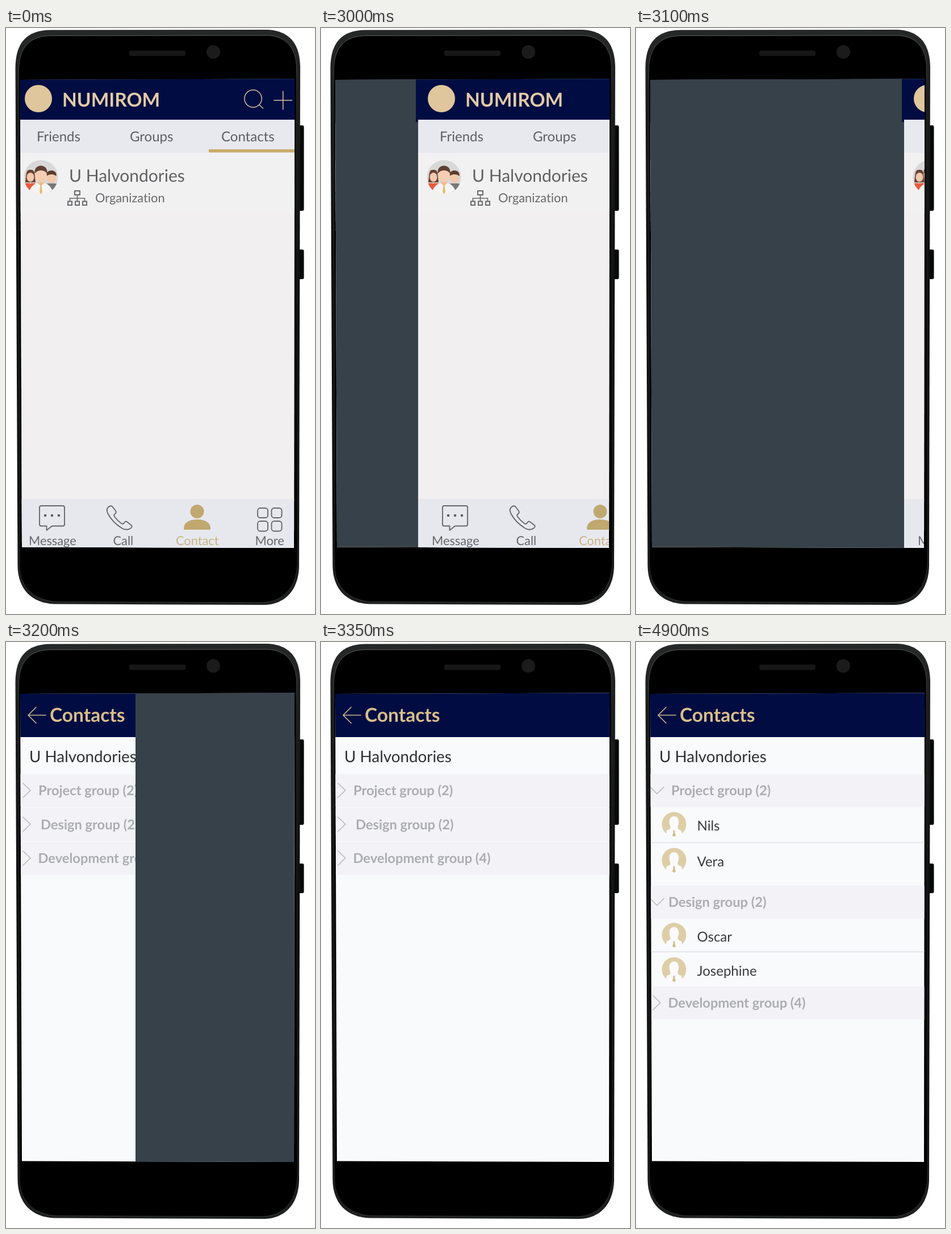
An HTML page for the animation above (5.9 s loop, 544 px wide and 1029 px high).

```html
<!DOCTYPE html>
<html lang="en">
<head>
<meta charset="utf-8">
<title>Contacts</title>
<style>
  html, body { margin: 0; width: 100%; height: 100%; overflow: hidden; background: #fff; }
  svg { display: block; }
  text { font-family: Lato, sans-serif; font-variant-ligatures: none; text-rendering: geometricPrecision; }
  .b { font-weight: 700; }
  .line { fill: none; stroke-linecap: round; stroke-linejoin: round; }
</style>
</head>
<body>
<svg width="544" height="1029" viewBox="0 0 544 1029">
  <defs>
    <linearGradient id="rim" x1="0" y1="0" x2="0" y2="1">
      <stop offset="0" stop-color="#262828"/>
      <stop offset=".12" stop-color="#1c1e1e"/>
      <stop offset=".4" stop-color="#101111"/>
      <stop offset=".85" stop-color="#121313"/>
      <stop offset="1" stop-color="#1f2121"/>
    </linearGradient>
    <linearGradient id="glint" x1="0" y1="0" x2="0" y2="1">
      <stop offset="0" stop-color="#5a5c5c"/>
      <stop offset=".1" stop-color="#2a2c2c"/>
      <stop offset=".9" stop-color="#1c1e1e"/>
      <stop offset="1" stop-color="#333535"/>
    </linearGradient>
    <clipPath id="screen"><path d="M25 91 508 89.5 507 913 28 911.5Z"/></clipPath>
    <clipPath id="disc"><circle cx="61.5" cy="262" r="30"/></clipPath>
    <g id="user">
      <circle r="21.5" fill="#decea6"/>
      <path d="M-6.5 4C-10 -3 -8.500 -14 0 -14S10 -3 6.500 4C6 9 8 9 13 11L15 22H-15L-13 11C-8 9 -6 9 -6.500 4Z" fill="#fafafc"/>
      <path d="M-2 11H2L1.200 14 3 20 0 22 -3 20 -1.200 14Z" fill="#d3bd87"/>
    </g>
  </defs>

  <!-- phone body -->
  <path d="M515 171H522Q524.500 171 524.500 174V318Q524.500 321 522 321H515ZM515 389H522Q524.500 389 524.500 392V438Q524.500 441 522 441H515Z" fill="#060707"/>
  <path d="M16.500 70C17 26 36 4 78 3.500L460 3C500 5 517 28 518 68L516 945C515 988 490 1012 455 1013L85 1011.500C45 1010 21 985 20.500 945Z" fill="url(#rim)"/>
  <path d="M22.500 72C24 33 42 13.500 80 13.500L462 13C494 15 510 35 511.500 68L513 940C511 984 488 1007 452 1009L88 1007.500C50 1005 25 983 24 945Z" fill="#000" stroke="url(#glint)" stroke-width="1"/>
  <rect x="217" y="39.500" width="99" height="9.500" rx="3" fill="#171717"/>
  <circle cx="365" cy="42" r="12" fill="#1b1b1c"/>

  <g clip-path="url(#screen)">
    <!-- organisation tree -->
    <rect x="20" y="85" width="495" height="832" fill="#f9fafc"/>
    <rect x="20" y="85" width="495" height="82" fill="#010d42"/>
    <path class="line" d="M53 114.500 39 128.500 53 142.500M39 128.500H70" stroke="#cdb686" stroke-width="1.700"/>
    <text class="b" x="77" y="140" font-size="33.500" fill="#d9be8b">Contacts</text>
    <text x="41" y="210.500" font-size="27.800" fill="#303032">U Halvondories</text>
    <g id="tree"></g>

    <rect id="cover" y="85" width="520" height="832" fill="#364149"/>

    <!-- home page -->
    <g id="home">
      <rect x="16" y="160" width="500" height="757" fill="#f1eff0"/>
      <rect x="16" y="219" width="500" height="107" fill="#f2f1f2"/>
      <path d="M12 85H516V161H16V165H12Z" fill="#010d42"/>
      <circle cx="57" cy="124" r="24" fill="#e0c69d"/>
      <text class="b" x="99" y="137.500" font-size="33.500" fill="#e4cba6">NUMIROM</text>
      <path class="line" d="M446.500 135.500 452.500 141M472 127H503.500M487.700 111V143" stroke="#d6c1a0" stroke-width="1.500"/>
      <circle cx="435" cy="124" r="15.200" fill="none" stroke="#d6c1a0" stroke-width="1.500"/>

      <rect x="16" y="161" width="500" height="58" fill="#e7e9ef"/>
      <rect x="357" y="213" width="160" height="5.500" fill="#c9ac69"/>
      <g font-size="24" fill="#5e5f62">
        <text x="54" y="199">Friends</text>
        <text x="218" y="199">Groups</text>
        <text x="379" y="199">Contacts</text>
      </g>

      <g clip-path="url(#disc)">
        <rect x="31" y="232" width="61" height="61" fill="#d8d8d8"/>
        <path d="M34 271C36 254 35 249 43 249S50 254 52 271Z" fill="#6b4033"/>
        <ellipse cx="43" cy="262" rx="6.500" ry="8" fill="#f2c9ac"/>
        <path d="M29 275Q36 271 43 273 50 271 56 275L43 284V293H29Z" fill="#e85b3e"/>
        <path d="M66 276Q72 272 80 273 89 272 95 276V293H80Z" fill="#77787a"/>
        <ellipse cx="80" cy="263" rx="8" ry="9.500" fill="#f2c9ac"/>
        <path d="M71.500 260C69 247 91 247 88.500 260Q85 257 80 257T71.500 260Z" fill="#5b3c2f"/>
        <path d="M39 293Q43 275 56 272H67Q80 275 84 293Z" fill="#f6f4f3"/>
        <path d="M56 264H67V273L61.500 277 56 273Z" fill="#eebf9e"/>
        <ellipse cx="61.500" cy="259" rx="10.500" ry="12" fill="#f5cdb0"/>
        <path d="M50.500 256C48 237 75 237 72.500 256Q69 250 61.500 250T50.500 256Z" fill="#5f4031"/>
        <path d="M59.500 273H63.500L62.500 277 64 288 61.500 292 59 288 60.500 277Z" fill="#e8b970"/>
      </g>
      <text x="111" y="270" font-size="30" fill="#5f6062">U Halvondories</text>
      <g fill="none" stroke="#68696b" stroke-width="2">
        <path d="M121 286H130V293H121ZM109 304.500H116V311H109ZM122 304.500H129V311H122ZM135 304.500H142V311H135Z"/>
        <path d="M125.500 293V304.500M112.500 304.500V299H138.500V304.500" stroke-width="1.700"/>
      </g>
      <text x="157" y="306" font-size="21.800" fill="#67686a">Organization</text>

      <rect x="16" y="827" width="500" height="90" fill="#e7e8ee"/>
      <g class="line" stroke="#66676a" stroke-width="1.900">
        <path d="M62 839H100Q103 839 103 842V871.500Q103 874.500 100 874.500H81L71.500 882V874.500H62Q59 874.500 59 871.500V842Q59 839 62 839Z"/>
        <path d="M180 841.500Q184 838 187 840L193 848Q195 851 192 853 189 855 191 858 196 865 203 870 206 872 208 869 210 865.500 213 867L220.500 873Q223 875.500 220 878 214 883 205 879 187 868 179 852 176 845 180 841.500Z"/>
      </g>
      <path d="M67 854h4v4h-4zM79 854h4v4h-4zM91 854h4v4h-4z" fill="#5f6062"/>
      <g fill="#c0a870">
        <circle cx="336.500" cy="849" r="12"/>
        <path d="M313 879C313 868 323 863 336.500 863S360 868 360 879Q360 881 357 881H316Q313 881 313 879Z"/>
      </g>
      <g fill="none" stroke="#66676a" stroke-width="1.900">
        <rect x="443" y="843" width="18" height="17" rx="4.500"/>
        <rect x="467.500" y="843" width="18" height="17" rx="4.500"/>
        <rect x="443" y="866" width="18" height="17.500" rx="4.500"/>
        <rect x="467.500" y="866" width="18" height="17.500" rx="4.500"/>
      </g>
      <g font-size="21.800" fill="#66676a">
        <text x="40" y="908">Message</text>
        <text x="188.500" y="908">Call</text>
        <text x="299" y="908" fill="#c9b485">Contact</text>
        <text x="438.500" y="908">More</text>
      </g>
    </g>
  </g>
</svg>
<script>
const LOOP = 5900, STEP = 50;
const SLIDE_AT = 3000, WIPE_AT = 3150, OPEN_ONE = 3900, OPEN_TWO = 4900;
const $ = id => document.getElementById(id);

const row = (y, label, x, open) => {
  const m = y + 28.5;
  const arrow = open ? `M25 ${m - 6}l12 12 12-12` : `M30 ${m - 12.5}l13 12.500-13 12.500`;
  return `<rect x="20" y="${y}" width="495" height="57.500" fill="#f2f2f7"/>
    <path class="line" d="${arrow}" stroke="#b7b8bb" stroke-width="1.500"/>
    <text class="b" x="${x}" y="${y + 37}" font-size="23.700" fill="#acadb1">${label}</text>`;
};
const member = (y, name) => `<use href="#user" x="67" y="${y}"/>
  <text x="107.500" y="${y + 11}" font-size="24" fill="#3a3a3d">${name}</text>`;
const rule = y => `<rect x="25" y="${y}" width="490" height="1.800" fill="#e3e4e8"/>`;

const project = row(232, 'Project group (2)', 62, true)
  + member(320, 'Nils') + rule(351.5) + member(383, 'Vera');
const design = row(428, 'Design group (2)', 57, true)
  + member(514.5, 'Oscar') + rule(543) + member(575, 'Josephine');
const closedDesign = y => row(y, 'Design group (2)', 61, false);
const development = y => row(y, 'Development group (4)', 56.5, false);

const states = [
  row(232, 'Project group (2)', 57, false) + closedDesign(291.5) + development(351),
  project + closedDesign(428) + development(487.5),
  project + design + development(605)
];
$('tree').innerHTML = states.map(s => `<g>${s}</g>`).join('');
const panes = [...$('tree').children];

function draw(t) {
  const n = Math.floor((t - SLIDE_AT) / STEP);
  const slide = n < 0 ? 0 : 155 + 150.5 * n;
  const edge = t < WIPE_AT ? 0 : Math.min(520, 78 + 150 * (n - 3));
  $('home').setAttribute('transform', `translate(${slide} 0)`);
  $('home').style.display = slide < 510 ? '' : 'none';
  $('cover').setAttribute('x', edge);
  const open = (t >= OPEN_ONE) + (t >= OPEN_TWO);
  panes.forEach((p, i) => p.style.display = i === open ? '' : 'none');
}

const start = performance.now();
function tick() {
  draw((performance.now() - start) % LOOP);
  requestAnimationFrame(tick);
}
tick();
</script>
</body>
</html>
```
